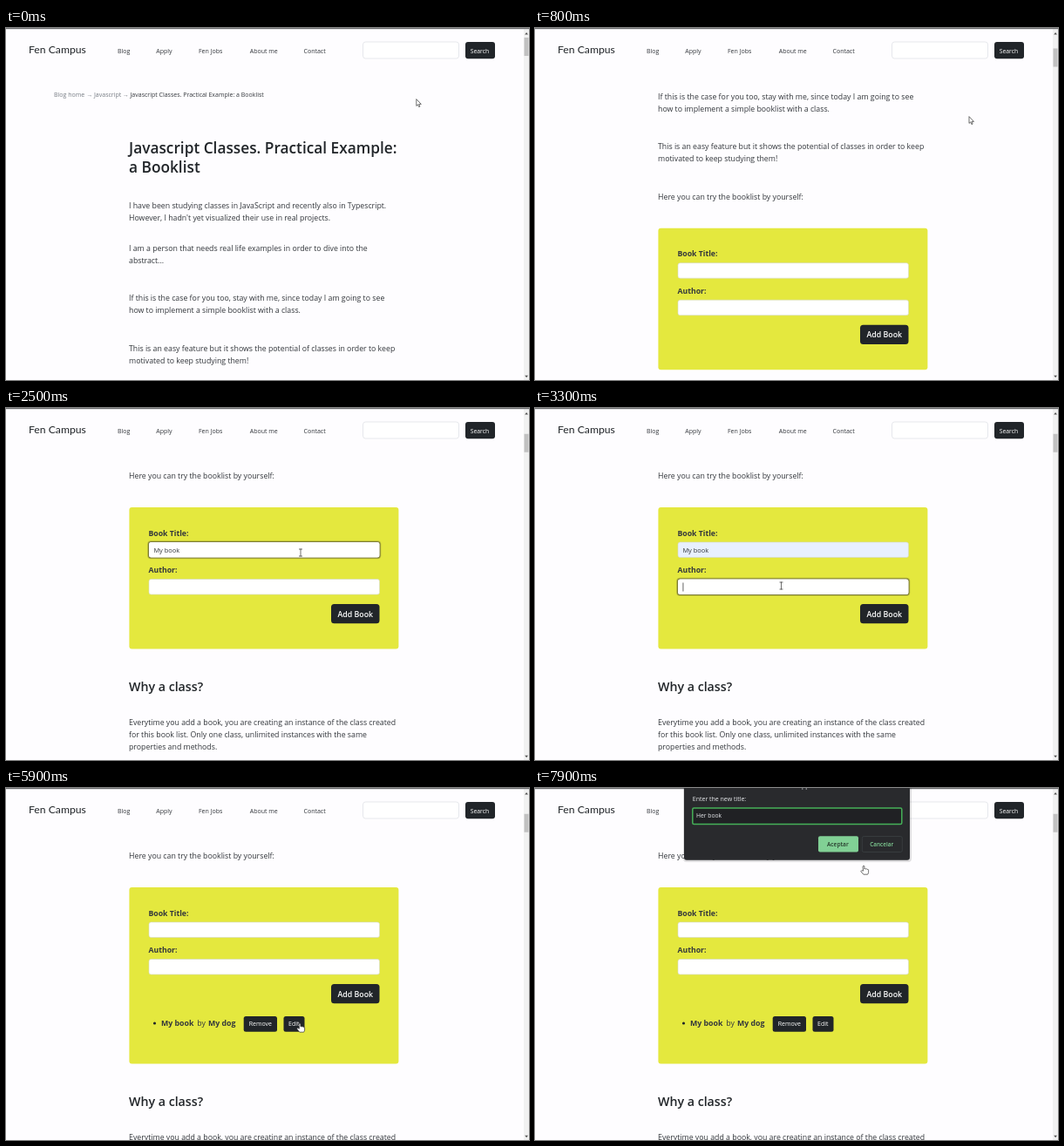
Write an HTML page that moves like this. It is 600 by 404 pixels and loops after 8000 ms.

```html
<!DOCTYPE html>
<html lang="en">
<head>
<meta charset="utf-8">
<title>Booklist demo</title>
<style>
  html, body { margin: 0; width: 100%; height: 100%; overflow: hidden; background: #fefdff; }
  svg { display: block; width: 100vw; height: 100vh; }
  text { font: 8.78px "Open Sans", "Noto Sans", sans-serif; fill: #33373c; white-space: pre; }
  .small text, text.small { font-size: 7px; }
  text.logo { font: 12.2px Lato, sans-serif; fill: #212529; }
  text.h1 { font-size: 17.27px; font-weight: 600; fill: #212529; }
  text.h2 { font-size: 14.2px; font-weight: 600; fill: #212529; }
  text.label { font-weight: 700; font-size: 8.7px; }
  text.value { font-size: 7.4px; }
  text.light { fill: #fff; }
  text.muted { fill: #757b82; }
  .bold { font-weight: 700; }
  .dark { fill: #212529; }
  .field { fill: #fff; stroke: #d3d8c8; stroke-width: .6; }
  .glow { fill: #8b8a38; opacity: .45; }
  .ring { fill: #fff; stroke: #7d7c35; stroke-width: 1.4; }
  .caret { fill: #222; }
  .dialog text { fill: #e8eaed; }
</style>
</head>
<body>
<svg viewBox="0 0 600 404">
  <rect width="600" height="404" fill="#fefdff"/>

  <g id="page">
    <g class="small">
      <text x="55" y="79" class="muted">Blog home</text>
      <text x="92.5" y="79" class="muted bold">→</text>
      <text x="101" y="79" class="muted">Javascript</text>
      <text x="134" y="79" class="muted bold">→</text>
      <text x="142.5" y="79">Javascript Classes. Practical Example: a Booklist</text>
    </g>
    <text class="h1" x="141" y="144.3">Javascript Classes. Practical Example:</text>
    <text class="h1" x="141" y="166.3">a Booklist</text>
    <text x="141" y="206.8">I have been studying classes in JavaScript and recently also in Typescript.</text>
    <text x="141" y="220.8">However, I hadn't yet visualized their use in real projects.</text>
    <text x="141" y="256">I am a person that needs real life examples in order to dive into the</text>
    <text x="141" y="270">abstract...</text>
    <text x="141" y="313.3">If this is the case for you too, stay with me, since today I am going to see</text>
    <text x="141" y="327.3">how to implement a simple booklist with a class.</text>
    <text x="141" y="370.5">This is an easy feature but it shows the potential of classes in order to keep</text>
    <text x="141" y="384.5">motivated to keep studying them!</text>

    <g transform="translate(0 347)">
      <text x="141" y="81">Here you can try the booklist by yourself:</text>
      <rect id="card" x="141.4" y="114" width="309" height="162.6" rx="3" fill="#e4e83e"/>
      <text class="label" x="163.5" y="146.8">Book Title:</text>
      <text class="label" x="163.5" y="189.4">Author:</text>
      <g id="title" transform="translate(164 154)"></g>
      <g id="author" transform="translate(164 196.5)"></g>
      <rect class="dark" x="373" y="225" width="55.5" height="22.3" rx="3.5"/>
      <text class="light" x="380.5" y="239.7" style="font-weight:600">Add Book</text>

      <g id="entry">
        <circle class="dark" cx="170.5" cy="270" r="1.6"/>
        <text class="bold" x="178" y="273">My book</text>
        <text x="219.3" y="273">by</text>
        <text class="bold" x="232" y="273">My dog</text>
        <rect class="dark" x="272.7" y="262" width="38.3" height="17.7" rx="2.5"/>
        <text class="small light" x="278.7" y="273.4">Remove</text>
        <rect class="dark" x="318.5" y="262" width="24" height="17.7" rx="2.5"/>
        <text class="small light" x="324" y="273.4">Edit</text>
      </g>

      <g id="rest">
        <text class="h2" x="141" y="324.7">Why a class?</text>
        <text x="141" y="364">Everytime you add a book, you are creating an instance of the class created</text>
        <text x="141" y="378">for this book list. Only one class, unlimited instances with the same</text>
        <text x="141" y="392">properties and methods.</text>
      </g>
    </g>
  </g>

  <g class="small">
    <rect width="594" height="51" fill="#fefdff"/>
    <text class="logo" x="26" y="29">Fen Campus</text>
    <text x="128" y="28.5">Blog</text>
    <text x="172.3" y="28.5">Apply</text>
    <text x="221" y="28.5">Fen Jobs</text>
    <text x="279.8" y="28.5">About me</text>
    <text x="341.5" y="28.5">Contact</text>
    <rect x="409.5" y="16" width="110" height="19" rx="3" fill="#fff" stroke="#dcdfe4" stroke-width=".7"/>
    <rect class="dark" x="527" y="16" width="34" height="19.3" rx="3"/>
    <text class="light" x="532.8" y="28.5" style="font-size:6.8px">Search</text>
  </g>

  <rect x="594" width="6" height="404" fill="#f1f1f1"/>
  <rect id="thumb" x="594.5" y="11" width="5" height="21" fill="#c1c1c1"/>
  <path d="M595.2 7.5l1.9-2.5 1.9 2.5zM595.2 398.8l1.9 2.5 1.9-2.5z" fill="#555"/>
  <rect width="600" height="1.2" fill="#6a6b6d"/>

  <g id="dialog" class="dialog small">
    <rect x="170" y="-4" width="262" height="89" rx="4" fill="#000" opacity=".12"/>
    <rect x="171" y="-4" width="259" height="86.8" rx="3" fill="#292a2d"/>
    <text x="302" y="-.3">app</text>
    <text x="180.8" y="15.3">Enter the new title:</text>
    <rect x="180.8" y="23" width="240" height="18.5" rx="1.5" fill="#202124" stroke="#45b058" stroke-width="1.5"/>
    <text id="prompt" x="185" y="34.4" style="font-size:6.75px"></text>
    <rect id="promptCaret" y="27.5" width=".7" height="9" fill="#fff"/>
    <rect x="325" y="55.3" width="46" height="18.2" rx="2" fill="#81d095"/>
    <text x="335" y="66.8" style="font-size:6.6px;font-weight:600;fill:#26382b">Aceptar</text>
    <rect x="375.3" y="55.5" width="46" height="18" rx="2" fill="none" stroke="#3c4043" stroke-width=".8"/>
    <text x="384.3" y="66.8" style="font-size:6.4px;font-weight:600;fill:#81d095">Cancelar</text>
  </g>

  <g id="cursor" stroke="#333" stroke-width=".7" stroke-linejoin="round" stroke-linecap="round">
    <path id="arrow" d="M0 0V7.4L1.7 5.9 2.9 8.6 4.1 8.1 2.9 5.4H5.1Z" fill="#fff"/>
    <path id="beam" d="M-1.6-4H1.6M0-4V4M-1.6 4H1.6" fill="none"/>
    <path id="hand" d="M-.8.8Q0-.8.9.8V3.8Q2 3 2.6 4 3.6 3.4 4.2 4.4 5.5 4 5.6 5.4V7.5Q5.5 9 4.6 10.2H-.2L-3.2 6.6Q-3 5-.8 6Z" fill="#fff"/>
  </g>
</svg>

<script>
const LOOP = 8000, STEP = 100;
const $ = id => document.getElementById(id);
const show = (el, on) => el.setAttribute("visibility", on ? "visible" : "hidden");
const move = (el, x, y) => el.setAttribute("transform", `translate(${x} ${y})`);

// [time, x, y] of the pointer's hot spot
const pointerPath = [
  [0, 470.8, 82], [300, 498, 102], [1000, 498, 102], [1300, 338, 166],
  [2700, 338, 166], [3200, 282.5, 204], [4300, 282.5, 204], [4600, 427, 207],
  [5000, 402, 240], [5300, 402, 240], [5800, 337, 270], [6200, 337, 270],
  [6800, 377, 89], [8000, 377, 89]
];
const pointerKinds = [[0, "arrow"], [1200, "beam"], [4800, "hand"], [5400, "arrow"], [5700, "hand"]];

const typing = {
  title: { text: "My book", from: 1500, to: 2200 },
  author: { text: "My dog", from: 3400, to: 4200 },
  prompt: { text: "Her book", from: 6600, to: 7700 }
};

function typed({ text, from, to }, t) {
  const part = Math.min(1, Math.max(0, (t - from) / (to - from)));
  return text.slice(0, Math.floor(part * text.length));
}

function along(path, t) {
  const i = Math.max(1, path.findIndex(p => p[0] >= t));
  const [a, b] = [path[i - 1], path[i]];
  const k = (t - a[0]) / (b[0] - a[0]);
  return [1, 2].map(n => a[n] + (b[n] - a[n]) * k);
}

function makeField(id) {
  const g = $(id);
  g.innerHTML = `
    <rect class="glow" x="-1.8" y="-1.8" width="268.1" height="21.1" rx="4"/>
    <rect class="ring" x="-.4" y="-.4" width="265.3" height="18.3" rx="3"/>
    <rect class="field" width="264.5" height="17.5" rx="2.5"/>
    <text class="value" x="5.4" y="11.5"></text>
    <path d="M5.5 13.3h9.5" stroke="#77747a" stroke-width=".7"/>
    <rect class="caret" y="4" width=".7" height="10"/>`;
  const [glow, ring, box, label, underline, caret] = g.children;
  return (value, focused, full, filled) => {
    label.textContent = value;
    show(glow, focused);
    show(ring, focused);
    box.style.fill = filled ? "#e8f0fe" : "#fff";
    box.style.stroke = focused ? "none" : "";
    show(underline, focused && id === "author" && value.length > 2);
    show(caret, focused && !full);
    caret.setAttribute("x", 5.6 + label.getComputedTextLength());
  };
}

const setTitle = makeField("title");
const setAuthor = makeField("author");

function draw(t) {
  const scroll = 347 * Math.min(1, Math.max(0, (t - 400) / 600));
  move($("page"), 0, -scroll);
  move($("thumb"), 0, scroll * 0.054);

  const added = t >= 5300;
  const title = added ? "" : typed(typing.title, t);
  const author = added ? "" : typed(typing.author, t);
  setTitle(title, t >= 1400 && t < 3200, title === typing.title.text, t >= 2700 && !added);
  setAuthor(author, t >= 3200 && !added, author === typing.author.text, false);

  $("card").setAttribute("height", added ? 202.6 : 162.6);
  show($("entry"), added);
  move($("rest"), 0, added ? 40 : 0);

  const open = t >= 6100;
  const answer = open ? typed(typing.prompt, t) : "";
  $("prompt").textContent = answer;
  $("dialog").style.display = open ? "" : "none";
  show($("promptCaret"), open && answer !== typing.prompt.text);
  if (open) $("promptCaret").setAttribute("x", 185.3 + $("prompt").getComputedTextLength());

  move($("cursor"), ...along(pointerPath, t));
  const kind = pointerKinds.filter(k => k[0] <= t).pop()[1];
  for (const id of ["arrow", "beam", "hand"]) show($(id), id === kind);
}

const start = performance.now();
function tick() {
  const t = (performance.now() - start) % LOOP;
  draw(Math.floor(t / STEP) * STEP);
  requestAnimationFrame(tick);
}
tick();
</script>
</body>
</html>
```
